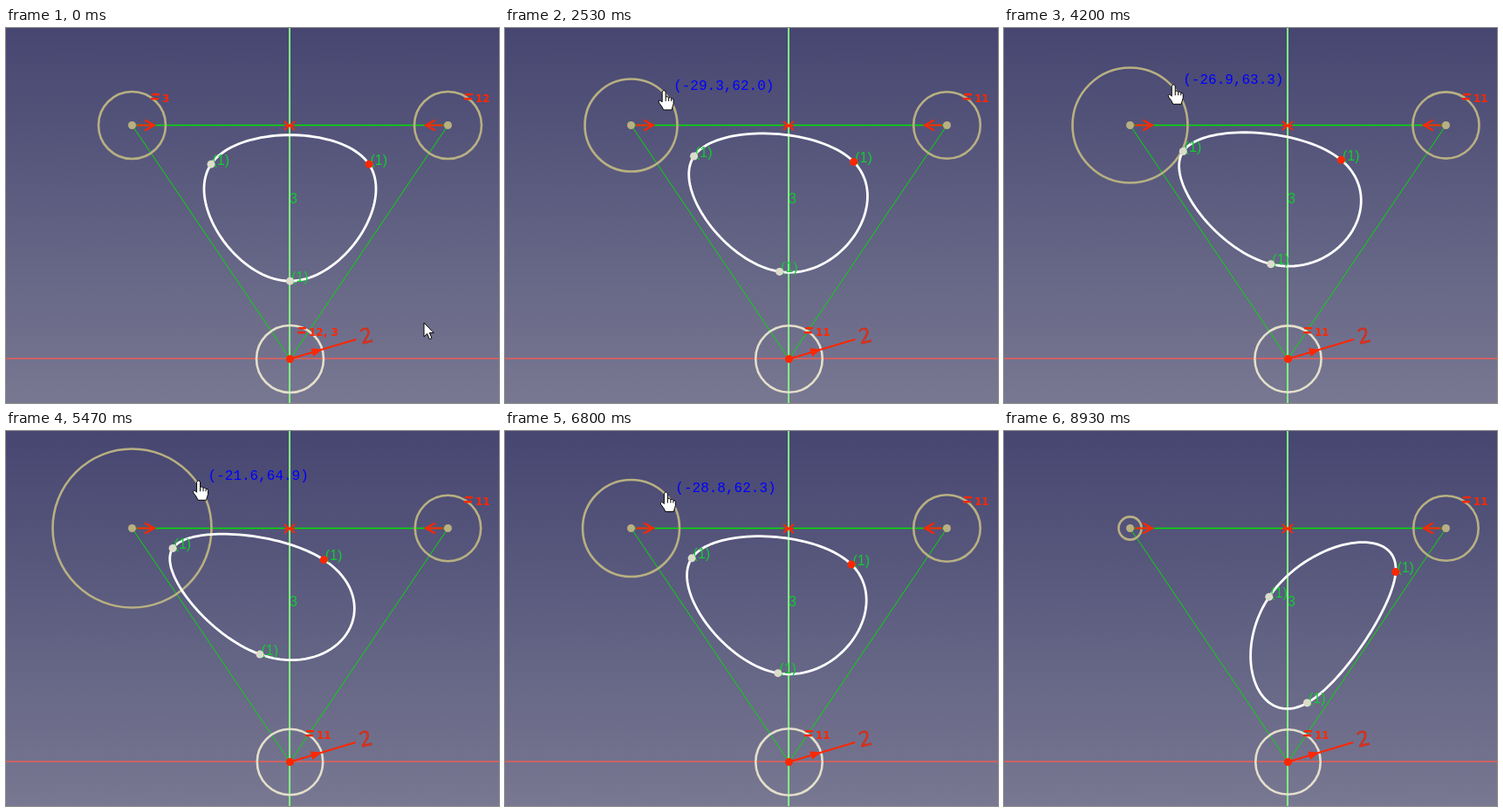
An HTML page with a canvas for the animation above (9.47 s loop, 565 px wide and 430 px high).

```html
<!DOCTYPE html>
<html lang="en">
<head>
<meta charset="utf-8">
<title>Weighted periodic spline</title>
<style>
html, body { margin: 0; width: 100%; height: 100%; overflow: hidden; background: #5f5f82; }
canvas { display: block; }
</style>
</head>
<body>
<canvas id="stage" width="565" height="430"></canvas>
<script>
const ctx = document.getElementById('stage').getContext('2d');
const LOOP = 9470, TICK = 200 / 3;
const RED = '#ff2600', GREEN = '#00e000', TAN = '#b8b082', PALE = '#e4e0cb';
const A = [144.5, 111.5], B = [506.5, 111.5], C = [325.5, 379.5];
const REST = 38.5;

// Ticks at which the interaction changes
const ARRIVE = 13, HOVER = 17, UNLINK = 23, GRAB = 33, RELEASE = 129, LEAVE = 134;

// Turning points of the dragged radius: tick, radius
const turns = [
  [32, REST], [38, 53], [51, 94.5], [56, 94.5], [63, 66], [67, 52], [71, 52], [82, 91],
  [88, 105.5], [91, 105.5], [94, 89.5], [106, REST], [113, 25], [119, 25], [123, 13.1]
];

const mix = (a, b, k) => a + (b - a) * k;
const clamp = v => Math.min(Math.max(v, 0), 1);

function dragRadius(n) {
  let r = REST;
  for (let i = 1; i < turns.length; i++) {
    const [t0, r0] = turns[i - 1], [t1, r1] = turns[i];
    if (n > t0) r = mix(r0, r1, clamp((n - t0) / (t1 - t0)));
  }
  return r;
}

// The solver lets the two linked circles give way a little
const linkedRadius = r => REST - Math.abs(r - REST) * (r > REST ? 0.015 : 0.05);

// The hand slides down the rim as the circle grows
function grip(r) {
  const angle = (68.3 - 0.335 * r) * Math.PI / 180;
  return [A[0] + (r + 1.5) * Math.cos(angle), A[1] - (r + 1.5) * Math.sin(angle)];
}

function path(points, color, width) {
  ctx.beginPath();
  points.forEach(p => ctx.lineTo(p[0], p[1]));
  ctx.strokeStyle = color;
  ctx.lineWidth = width;
  ctx.stroke();
}

function ring(c, r, color) {
  ctx.beginPath();
  ctx.arc(c[0], c[1], r, 0, 2 * Math.PI);
  ctx.strokeStyle = color;
  ctx.lineWidth = 2.6;
  ctx.stroke();
}

function dot(c, color) {
  ctx.beginPath();
  ctx.arc(c[0], c[1], 4.5, 0, 2 * Math.PI);
  ctx.fillStyle = color;
  ctx.fill();
}

function text(str, x, y, color, font) {
  ctx.font = font;
  ctx.fillStyle = color;
  ctx.fillText(str, x, y);
}

const label = (str, x, y) => text(str, x, y, '#10cc30', '16px "Liberation Sans", Arial, sans-serif');

function equalMark(x, y, str) {
  ctx.fillStyle = RED;
  ctx.fillRect(x + 1, y, 9, 2.4);
  ctx.fillRect(x, y + 5, 9, 2.4);
  text(str, x + 13, y + 9.5, RED, 'bold 12px "DejaVu Sans", sans-serif');
}

// Rational uniform cubic B-spline over the three poles
function splinePoint(poles, weights, i, u) {
  const v = 1 - u;
  const basis = [v ** 3, 3 * u ** 3 - 6 * u * u + 4, 3 * v ** 3 - 6 * v * v + 4, u ** 3];
  let x = 0, y = 0, sum = 0;
  basis.forEach((b, j) => {
    const k = (i + j) % 3, w = b * weights[k];
    x += w * poles[k][0];
    y += w * poles[k][1];
    sum += w;
  });
  return [x / sum, y / sum];
}

function sidePointer(tip, dir) {
  const y = A[1], back = tip - 11 * dir;
  path([[tip - 20 * dir, y], [tip, y]], RED, 2);
  path([[back, y - 6], [tip, y], [back, y + 6]], RED, 2);
}

function middleMark(x, y) {
  for (const s of [-5, 0, 5]) path([[x - 6, y - s], [x + 6, y + s]], RED, 1.8);
}

function radiusMark(r) {
  const end = [C[0] + r + 37.5, 357];
  path([C, end], RED, 2);
  ctx.save();
  ctx.translate(C[0], C[1]);
  ctx.rotate(Math.atan2(end[1] - C[1], end[0] - C[0]));
  ctx.beginPath();
  ctx.moveTo(r, 0);
  ctx.lineTo(r - 12, -5);
  ctx.lineTo(r - 12, 5);
  ctx.fillStyle = RED;
  ctx.fill();
  ctx.restore();
  ctx.save();
  ctx.translate(r + 369.5, 362.5);
  ctx.rotate(-0.24);
  text('2', 0, 0, '#e8301a', '24px "Open Sans", "Noto Sans", sans-serif');
  ctx.strokeStyle = '#c03020';
  ctx.lineWidth = 0.7;
  ctx.strokeText('2', 0, 0);
  ctx.restore();
}

const handShape = new Path2D('M-2 12V1Q0-2 2 1V7Q4 6 5.5 8Q7.5 7 8.5 9Q11 8.5 11 11V15Q10 18 9 22H-.5Q-2 18-5.5 14Q-7 11.5-5 11Q-3.5 11-2 13Z');
const handLines = new Path2D('M2 7V12M5.5 8V12M8.5 9V12');
const arrowShape = new Path2D('M0 0V16L3.7 12.6L6.3 18.8L9 17.6L6.4 11.6H11.3Z');

function pointer(shape, x, y, lines) {
  ctx.save();
  ctx.translate(x, y);
  ctx.fillStyle = '#fff';
  ctx.strokeStyle = '#000';
  ctx.lineWidth = 1;
  ctx.fill(shape);
  ctx.stroke(shape);
  if (lines) ctx.stroke(lines);
  ctx.restore();
}

function drawCursor(n, [x, y]) {
  if (n < HOVER) {
    const u = clamp(n / ARRIVE), k = u * u * (3 - 2 * u);
    pointer(arrowShape, mix(479, 173, k), mix(338, 82, k));
  } else if (n < RELEASE) {
    pointer(handShape, x + 3, y + 2.5, handLines);
  } else if (n < LEAVE) {
    const k = (n - RELEASE + 1) / (LEAVE - RELEASE);
    pointer(arrowShape, mix(x, 66, k), mix(y, 340, k));
  }
}

function draw(n) {
  const r = dragRadius(n), other = linkedRadius(r), hold = grip(r);
  const poles = [A, B, C], weights = [r, other, other];

  const sky = ctx.createLinearGradient(0, 0, 0, 430);
  sky.addColorStop(0, '#464671');
  sky.addColorStop(1, '#787892');
  ctx.fillStyle = sky;
  ctx.fillRect(0, 0, 565, 430);

  path([[0, 379], [565, 379]], '#cc6262', 2);
  path([[325, 0], [325, 430]], '#83ff83', 2);
  path([A, B], GREEN, 1.5);
  path([A, C], GREEN, 1);
  path([B, C], GREEN, 1);

  ring(A, r, TAN);
  ring(B, other, TAN);
  ring(C, other, PALE);

  const curve = [];
  for (let i = 0; i < 3; i++)
    for (let s = 0; s <= 40; s++) curve.push(splinePoint(poles, weights, i, s / 40));
  path(curve, '#fff', 2.8);

  const knots = [2, 0, 1].map(i => splinePoint(poles, weights, i, 0));
  knots.forEach(k => label('(1)', k[0] + 1.5, k[1] + 0.5));
  label('3', 325, 201);

  dot(A, TAN);
  dot(B, TAN);
  sidePointer(170, 1);
  sidePointer(481, -1);
  middleMark(325, 112);
  radiusMark(other);
  knots.forEach((k, i) => dot(k, i === 1 ? RED : '#dcdccb'));
  dot(C, RED);

  const linked = n < UNLINK;
  if (linked) equalMark(166, 75, '3');
  equalMark(525, 75, linked ? '12' : '11');
  equalMark(linked ? 334 : 343, 343, linked ? '12, 3' : '11');

  if (n >= GRAB && n < RELEASE) {
    const x = (hold[0] - C[0]) / 5, y = (C[1] - hold[1]) / 5;
    text(`(${x.toFixed(1)},${y.toFixed(1)})`, hold[0] + 14, hold[1] + 1.5,
      '#0000ff', '16px "Liberation Mono", monospace');
  }
  drawCursor(n, hold);
}

const start = performance.now();
function tick() {
  const t = (performance.now() - start) % LOOP;
  draw(Math.floor((t + 4) / TICK));
  requestAnimationFrame(tick);
}
tick();
</script>
</body>
</html>
```
